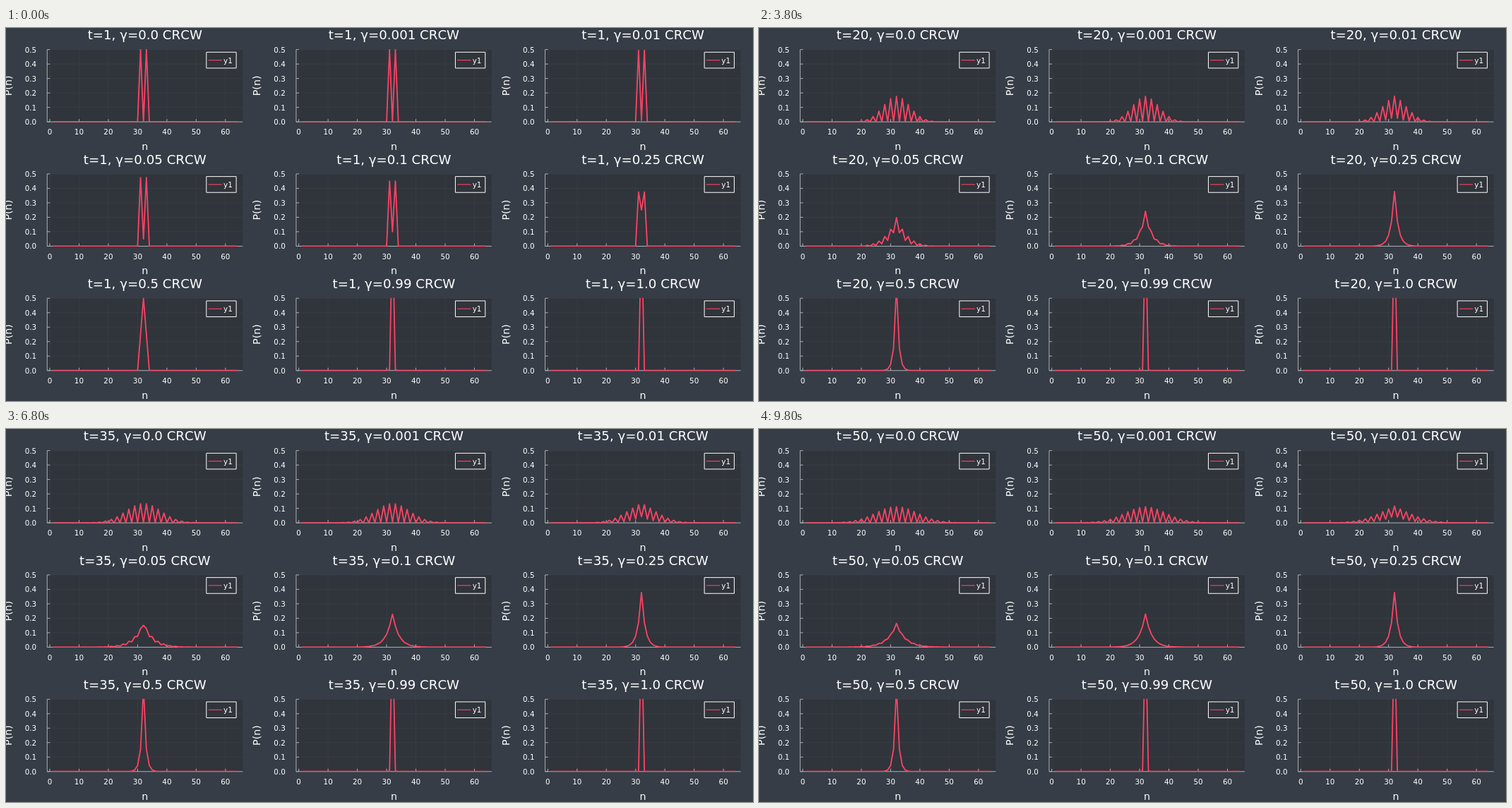
Write an HTML page with a canvas that moves like this. It is 1058 px wide and 529 px high and loops after 10 s.

```html
<!DOCTYPE html>
<html lang="en">
<head>
<meta charset="utf-8">
<title>Random walk with resetting</title>
<style>
html, body { margin: 0; width: 100%; height: 100%; overflow: hidden; background: #363d46; }
canvas { display: block; }
</style>
</head>
<body>
<canvas id="stage" width="1058" height="529"></canvas>
<script>
const ctx = document.getElementById('stage').getContext('2d');
const GAMMAS = ['0.0', '0.001', '0.01', '0.05', '0.1', '0.25', '0.5', '0.99', '1.0'];
const STEPS = 50, STEP_MS = 200;
const SITES = 64, ORIGIN = 32;
const BG = '#363d46', INSIDE = '#30343b', AXIS = '#adb2b7', WHITE = '#ffffff', RED = '#fe4365';
const LEFT = 58.3, RIGHT = 335.2, TOP = 30.6, BOTTOM = 133.1;
const MID_X = (LEFT + RIGHT) / 2, MID_Y = (TOP + BOTTOM) / 2;

const xOf = n => 62 + n * 4.147;
const yOf = p => BOTTOM - p / 0.5 * (BOTTOM - TOP);

// Each step: hop left or right, or jump back to the origin with probability gamma.
function walk(gamma) {
  let p = new Array(SITES + 2).fill(0);
  p[ORIGIN] = 1;
  const history = [p];
  for (let t = 1; t <= STEPS; t++) {
    const next = p.map((_, n) =>
      (1 - gamma) / 2 * ((p[n - 1] || 0) + (p[n + 1] || 0)));
    next[ORIGIN] += gamma;
    history.push(p = next);
  }
  return history;
}
const walks = GAMMAS.map(g => walk(Number(g)));

function line(x1, y1, x2, y2, color, width) {
  ctx.strokeStyle = color;
  ctx.lineWidth = width;
  ctx.beginPath();
  ctx.moveTo(x1, y1);
  ctx.lineTo(x2, y2);
  ctx.stroke();
}

function text(str, x, y, size, align = 'center') {
  ctx.font = size + 'px "DejaVu Sans", sans-serif';
  ctx.textAlign = align;
  ctx.fillStyle = WHITE;
  ctx.fillText(str, x, y);
}

function drawAxes() {
  ctx.fillStyle = INSIDE;
  ctx.fillRect(LEFT, TOP, RIGHT - LEFT, BOTTOM - TOP);
  const grid = 'rgba(173,178,183,0.1)';
  for (let n = 0; n <= 60; n += 10) {
    const x = xOf(n);
    line(x, TOP, x, BOTTOM, grid, 0.6);
    line(x, BOTTOM, x, BOTTOM - 4, AXIS, 1);
    text(n, x, 151.3, 10.4);
  }
  for (let i = 0; i <= 5; i++) {
    const y = yOf(i / 10);
    line(LEFT, y, RIGHT, y, grid, 0.6);
    line(LEFT, y, LEFT + 4, y, AXIS, 1);
    text((i / 10).toFixed(1), 43.2, y + 3.9, 10.4, 'right');
  }
  line(LEFT, TOP, LEFT, BOTTOM, AXIS, 1);
  line(LEFT, BOTTOM, RIGHT, BOTTOM, AXIS, 1);
  text('n', MID_X, 173, 14.3);
  ctx.save();
  ctx.translate(7.8, MID_Y);
  ctx.rotate(-Math.PI / 2);
  text('P(n)', 0, 0, 14.3);
  ctx.restore();
}

function drawCurve(p) {
  ctx.save();
  ctx.beginPath();
  ctx.rect(LEFT, TOP - 0.5, RIGHT - LEFT, BOTTOM - TOP + 1);
  ctx.clip();
  ctx.beginPath();
  for (let n = 1; n <= SITES; n++) ctx.lineTo(xOf(n), yOf(p[n]));
  ctx.strokeStyle = RED;
  ctx.lineWidth = 1.8;
  ctx.stroke();
  ctx.restore();
}

function drawLegend() {
  ctx.fillStyle = INSIDE;
  ctx.strokeStyle = WHITE;
  ctx.lineWidth = 1;
  ctx.beginPath();
  ctx.rect(283.8, 34.3, 42.3, 22.6);
  ctx.fill();
  ctx.stroke();
  line(286.5, 45.6, 305.8, 45.6, RED, 1.1);
  text('y1', 308, 49.5, 10.4, 'left');
}

function draw(t) {
  ctx.fillStyle = BG;
  ctx.fillRect(0, 0, 1058, 529);
  GAMMAS.forEach((gamma, i) => {
    ctx.save();
    ctx.translate(i % 3 * 1058 / 3, Math.floor(i / 3) * 529 / 3);
    drawAxes();
    drawCurve(walks[i][t]);
    drawLegend();
    text(`t=${t}, γ=${gamma} CRCW`, MID_X, 16.2, 18.2);
    ctx.restore();
  });
}

ctx.fontKerning = 'none';
ctx.lineJoin = 'round';
const start = performance.now();
let shown = 0;
function frame() {
  const elapsed = Math.max(0, performance.now() - start);
  const t = Math.floor(elapsed / STEP_MS) % STEPS + 1;
  if (t !== shown) draw(shown = t);
  requestAnimationFrame(frame);
}
frame();
</script>
</body>
</html>
```
